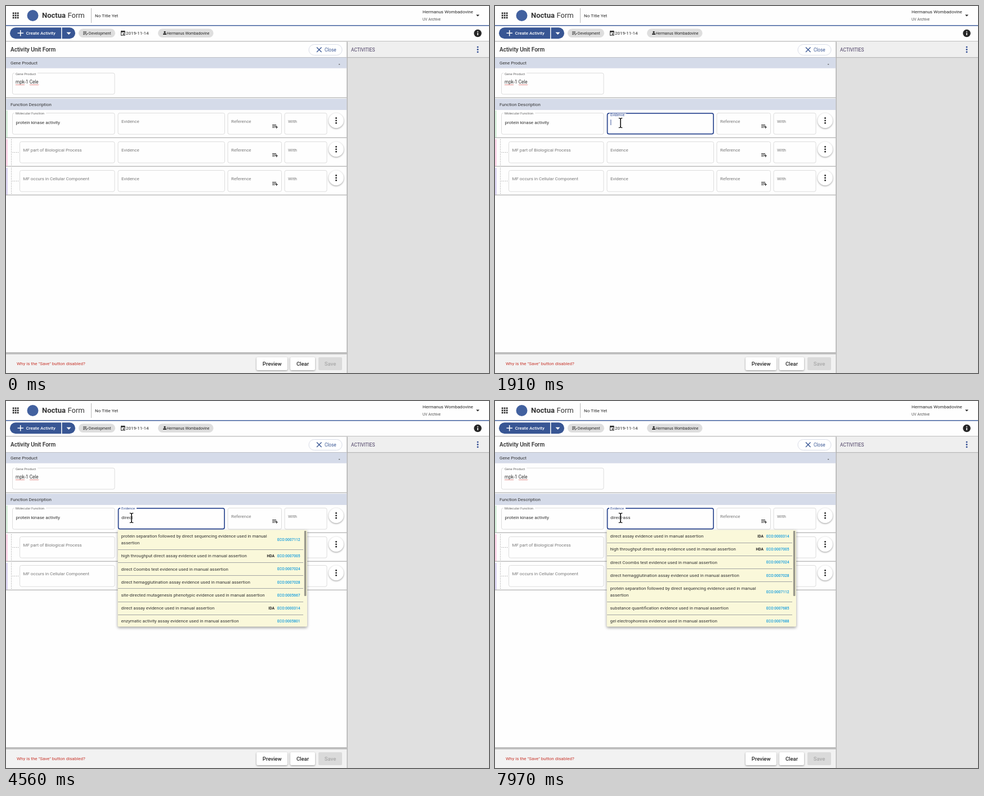
Animation of 858 by 653 pixels, one loop 8 s. Source, as an HTML page with a canvas:

```html
<!DOCTYPE html>
<html lang="en">
<head>
<meta charset="utf-8">
<title>Activity form</title>
<style>
html, body { margin: 0; width: 858px; height: 653px; overflow: hidden; background: #fff; }
canvas { display: block; }
</style>
</head>
<body>
<canvas id="stage" width="858" height="653"></canvas>
<script>
const g = document.getElementById('stage').getContext('2d');
const LOOP = 8000;
const BLUE = '#385694', FOCUS = '#2f4a93', INK = '#262626', HINT = '#787878', EDGE = '#dcdcdc';
const PERSON = 'Hermanus Wombadovine';

// [time, typed text]
const TYPING = [[0, ''], [3060, 'd'], [3230, 'di'], [3380, 'dir'], [3460, 'dire'], [3780, 'direc'],
  [4010, 'direct'], [5950, 'direct-'], [6250, 'direct-s'], [6880, 'direct-'],
  [7050, 'direct-a'], [7280, 'direct-as'], [7430, 'direct-ass']];
const CARET_OFF = [[0, 1760], [2370, 2830], [4560, 5090], [5640, 5950], [6805, 6880], [7970, 8000]];

const TAIL = ' evidence used in manual assertion';
const item = (name, code, tag = '') => ({ lines: [name + TAIL], code, tag });
const SEPARATION = {
  lines: ['protein separation followed by direct sequencing evidence used in manual', 'assertion'],
  code: '0007112', tag: ''
};
const HDA = item('high throughput direct assay', '0007005', 'HDA');
const IDA = item('direct assay', '0000314', 'IDA');
const COOMBS = item('direct Coombs test', '0007024');
const HEMA = item('direct hemagglutination assay', '0007028');
const QUANT = item('substance quantification', '0007685');
const BEST = [IDA, HDA, COOMBS, HEMA, SEPARATION];
const LISTS = [
  [0, null],
  [4560, [SEPARATION, HDA, COOMBS, HEMA, item('site-directed mutagenesis phenotypic', '0005667'),
    IDA, item('enzymatic activity assay', '0005801')]],
  [6730, [...BEST, item('glutathione S-transferase pull-down assay', '0005640'), QUANT]],
  [7890, [...BEST, QUANT, item('gel electrophoresis', '0007688')]]
];

const at = (table, t) => table.filter(row => row[0] <= t).pop()[1];
const clamp = v => Math.max(0, Math.min(1, v));

function rect(x, y, w, h, color) {
  g.fillStyle = color;
  g.fillRect(x, y, w, h);
}

function box(x, y, w, h, r, fill, stroke, width = 1) {
  g.beginPath();
  g.roundRect(x, y, w, h, r);
  if (fill) { g.fillStyle = fill; g.fill(); }
  if (stroke) { g.strokeStyle = stroke; g.lineWidth = width; g.stroke(); }
}

function disc(x, y, r, color) {
  g.beginPath();
  g.arc(x, y, r, 0, 7);
  g.fillStyle = color;
  g.fill();
}

function path(color, width, ...lines) {
  g.beginPath();
  for (const p of lines)
    for (let i = 0; i < p.length; i += 2) i ? g.lineTo(p[i], p[i + 1]) : g.moveTo(p[0], p[1]);
  g.strokeStyle = color;
  g.lineWidth = width;
  g.stroke();
}

function poly(color, ...p) {
  g.beginPath();
  for (let i = 0; i < p.length; i += 2) g.lineTo(p[i], p[i + 1]);
  g.closePath();
  g.fillStyle = color;
  g.fill();
}

// y is the middle of the capitals
function text(str, x, y, size, color = INK, weight = 400, align = 'left') {
  g.font = `${weight} ${size}px Roboto, sans-serif`;
  g.textAlign = align;
  g.fillStyle = color;
  g.fillText(str, x, y + size * 0.355);
  return g.measureText(str).width;
}

function shadowed(blur, dy, draw) {
  g.save();
  g.shadowColor = 'rgba(0,0,0,.4)';
  g.shadowBlur = blur;
  g.shadowOffsetY = dy;
  draw();
  g.restore();
}

function dots(x, y, color) {
  for (const d of [-4.4, 0, 4.4]) disc(x, y + d, 1.45, color);
}

function floatLabel(str, x, y, size, color) {
  g.font = `400 ${size}px Roboto, sans-serif`;
  rect(x - 2, y - 2.5, g.measureText(str).width + 5, 4, '#fefefe');
  text(str, x, y, size, color);
}

function field(x, y, right, label) {
  box(x + .5, y + .5, right - x - 1, 37.7, 3, '#fefefe', EDGE);
  if (label) text(label, x + 6.5, y + 15, 7.95, HINT);
}

function squiggle(x0, x1, y) {
  const p = [];
  for (let x = x0; x <= x1; x++) p.push(x, y + (x % 2 ? .5 : -.5));
  path('#d9534f', .8, p);
}

function header() {
  for (let i = 0; i < 9; i++) rect(11.8 + i % 3 * 4, 11.5 + Math.floor(i / 3) * 4, 2.7, 2.7, INK);
  disc(47.5, 17, 10, '#42619f');
  text('Noctua', 64, 16.7, 13, '#333', 700);
  text('Form', 109.5, 16.7, 13, '#333');
  rect(151, 4, 1, 26, '#bbb');
  text('No Title Yet', 158, 16.7, 8);
  text(PERSON, 740, 10.2, 8);
  text('UV Archive', 740, 23.7, 6.65, '#555');
  poly(INK, 835, 15.5, 841, 15.5, 838, 18.5);
  rect(0, 34, 858, 1.5, '#42619f');
}

function toolbar() {
  box(7, 38.2, 91, 20, [10, 0, 0, 10], BLUE);
  box(99.5, 38.2, 23.5, 20, [0, 10, 10, 0], BLUE);
  path('#fff', 1.5, [20.5, 48.2, 31, 48.2], [25.7, 43, 25.7, 53.4]);
  text('Create Activity', 35.5, 48.2, 8, '#fff', 500);
  poly('#fff', 107.5, 46.8, 115.5, 46.8, 111.5, 51);

  box(129, 40.5, 65, 15.5, 7.75, '#dedede');
  path(INK, 1, [137, 46, 143, 46], [137, 48.3, 143, 48.3], [137, 50.6, 140, 50.6],
    [141, 49.8, 142.7, 51.4, 146, 48]);
  text('Development', 147, 48.3, 6.75);
  g.strokeStyle = INK;
  g.lineWidth = 1;
  g.strokeRect(204.5, 45, 6.5, 7.3);
  rect(204, 44.5, 7.5, 2.3, INK);
  rect(205.5, 43.5, 1, 1, INK);
  rect(209, 43.5, 1, 1, INK);
  rect(207.5, 48.8, 2.2, 2.2, INK);
  text('2019-11-14', 213, 48.3, 8);
  box(270, 40.5, 98.5, 15.5, 7.75, '#dedede');
  disc(282, 46.3, 1.6, INK);
  box(279, 48.6, 6, 2.4, [1.6, 1.6, 0, 0], INK);
  text(PERSON, 285.5, 48.3, 6.75);
  disc(838, 48.5, 6.8, INK);
  rect(837.2, 44.8, 1.6, 1.6, '#fff');
  rect(837.2, 47.6, 1.6, 4.4, '#fff');
  rect(0, 62, 858, 1.5, '#c4c4c4');
}

function sidePanel() {
  rect(606, 63.5, 252, 28, '#efefef');
  rect(606, 92, 252, 561, '#e0e0e0');
  rect(606, 91, 252, 1.2, '#b8b8b8');
  rect(605.3, 63.5, 1.4, 589.5, '#a9a9a9');
  text('ACTIVITIES', 613, 77.8, 8.35, '#45385f');
  dots(838, 77.5, FOCUS);
}

function sectionBar(y, h, title) {
  rect(0, y, 605.3, h, '#d5dbe9');
  text(title, 8, y + h / 2 - .2, 7.95, '#333');
}

function formRow(y, strip, label) {
  rect(0, y - 4, 3, 48, strip);
  if (label) {
    g.setLineDash([1, 2]);
    path('#8c8c8c', 1, [9.5, y - 4, 9.5, y + 43], [12, y + 19.5, 23, y + 19.5]);
    g.setLineDash([]);
  }
  field(label ? 24 : 11, y, 193.5, label);
  field(198.5, y, 389, 'Evidence');
  field(393.5, y, 490, 'Reference');
  field(494.5, y, 570.5, 'With');
  path(INK, 1, [473, y + 21.5, 480, y + 21.5], [473, y + 23.8, 480, y + 23.8], [473, y + 26.1, 477.5, y + 26.1],
    [478.2, y + 25.6, 483, y + 25.6], [480.6, y + 23.2, 480.6, y + 28]);
  shadowed(3, 1, () => disc(586.5, y + 13.9, 13.3, '#fff'));
  dots(586.5, y + 13.9, INK);
  rect(0, y + 43.6, 605.3, 1.4, '#b9b9b9');
}

function form() {
  text('Activity Unit Form', 8, 77.5, 10.05, INK, 500);
  box(538, 68.5, 59, 19, 9.5, '#fff', '#d9dde8');
  path(BLUE, 1.4, [552, 73.5, 560.5, 82], [560.5, 73.5, 552, 82]);
  text('Close', 566, 78, 8.2, BLUE);
  rect(0, 91, 605.3, 1.2, '#bdbfc6');
  sectionBar(92, 18.7, 'Gene Product');
  rect(591, 103.2, 2.2, 1.2, '#555');
  field(11, 118.8, 193.5);
  floatLabel('Gene Product', 17, 120.6, 6, '#666');
  text('mpk-1 Cele', 17, 135.5, 8.15, '#333');
  squiggle(17, 33, 140.2);
  squiggle(42, 58, 140.2);
  rect(0, 162.5, 605.3, 1.4, '#b9b9b9');
  sectionBar(165, 20, 'Function Description');
  formRow(190, '#d7efdc');
  floatLabel('Molecular Function', 17, 191.3, 6, '#666');
  text('protein kinase activity', 17.5, 207.3, 8.1, '#333');
  formRow(241, '#fcd5e8', 'MF part of Biological Process');
  formRow(292, '#dcd6f2', 'MF occurs in Cellular Component');
}

function footer() {
  rect(0, 620, 605.3, 33, '#f2f2f2');
  rect(0, 616, 605.3, 3.8, '#bcbcbc');
  text('Why is the "Save" button disabled?', 19, 636, 8, '#c8372d');
  shadowed(3, 1, () => {
    box(445, 625, 55, 23, 2, '#fff');
    box(505, 625, 44, 23, 2, '#fff');
  });
  box(555, 625, 42, 23, 2, '#dadada');
  text('Preview', 472.7, 636.5, 9.5, INK, 500, 'center');
  text('Clear', 527, 636.5, 9.5, INK, 500, 'center');
  text('Save', 576, 636.5, 9.5, '#a9a9a9', 500, 'center');
}

function activeField(t) {
  if (t < 980) return;
  const outline = (fill, color) => box(199.6, 190.9, 188.4, 36.8, 3, fill, color, 1.7);
  if (t < 1760) {
    g.globalAlpha = clamp((Math.floor((t - 980) / 76.6) + 1) / 4);
    outline(null, INK);
    g.globalAlpha = 1;
    return;
  }
  rect(204, 198, 40, 16, '#fefefe');
  outline(null, FOCUS);
  const rise = 1 - (1 - clamp((t - 1760) / 400)) ** 4;
  floatLabel('Evidence', 205, 205 - 13.7 * rise, 7.95 - 1.95 * rise, FOCUS);
  const end = 205 + text(at(TYPING, t), 205, 207.3, 8.1, '#333');
  if (!CARET_OFF.some(([a, b]) => t >= a && t < b)) rect(end + .4, 202, .9, 10, FOCUS);
}

function suggestions(list) {
  shadowed(5, 2, () => box(198.5, 229.5, 336.5, 172, 2, '#faf8da'));
  let y = 228.6;
  list.forEach((row, i) => {
    const h = row.lines.length > 1 ? 35.2 : 23.2, mid = y + h / 2;
    row.lines.forEach((line, n) =>
      text(line, 204.5, mid + .2 + (n - (row.lines.length - 1) / 2) * 12, 7.92, '#333'));
    text('ECO:' + row.code, 522.5, mid + .4, 6.6, '#0f9bde', 500, 'right');
    text(row.tag, 477, mid + .4, 6.65, INK, 700, 'right');
    y += h;
    if (i < list.length - 1) rect(199, Math.round(y), 329, 1, '#a3a5a4');
  });
  box(529.8, 231, 3.6, 116, 1, '#9a998c');
}

function iBeam(x, y) {
  path('#000', 1.5, [x, y - 7.5, x, y + 7.5]);
  for (const s of [-1, 1])
    path('#000', 1.2, [x - 3.3, y + s * 8.5, x - 1.3, y + s * 8.3, x, y + s * 7.3,
      x + 1.3, y + s * 8.3, x + 3.3, y + s * 8.5]);
}

function arrow(x, y) {
  g.beginPath();
  [[0, 0], [0, 12], [2.8, 9.5], [4.6, 13.6], [6.5, 12.8], [4.7, 8.8], [8.4, 8.6]]
    .forEach(([dx, dy]) => g.lineTo(x + dx, y + dy));
  g.closePath();
  g.fillStyle = '#fff';
  g.fill();
  g.strokeStyle = '#000';
  g.lineWidth = .9;
  g.stroke();
}

function pointer(t) {
  if (t < 210) return;
  const s = clamp(Math.floor((t - 210) / 77.5) / 8);
  const x = 803 - 580 * s * s * (3 - 2 * s);
  const way = [[223, 208], [330, 262], [434, 348], [803, 642]];
  const i = Math.max(1, way.findIndex(p => p[0] >= x));
  const [a, b] = [way[i - 1], way[i]];
  const y = a[1] + (b[1] - a[1]) * (x - a[0]) / (b[0] - a[0]);
  x < 388 && y < 280 ? iBeam(x, y) : arrow(x, y);
}

function draw(t) {
  rect(0, 0, 858, 653, '#fefefe');
  header();
  toolbar();
  sidePanel();
  form();
  footer();
  activeField(t);
  const list = at(LISTS, t);
  if (list) suggestions(list);
  pointer(t);
}

const start = performance.now();
function tick() {
  draw((performance.now() - start) % LOOP);
  requestAnimationFrame(tick);
}
tick();
</script>
</body>
</html>
```
